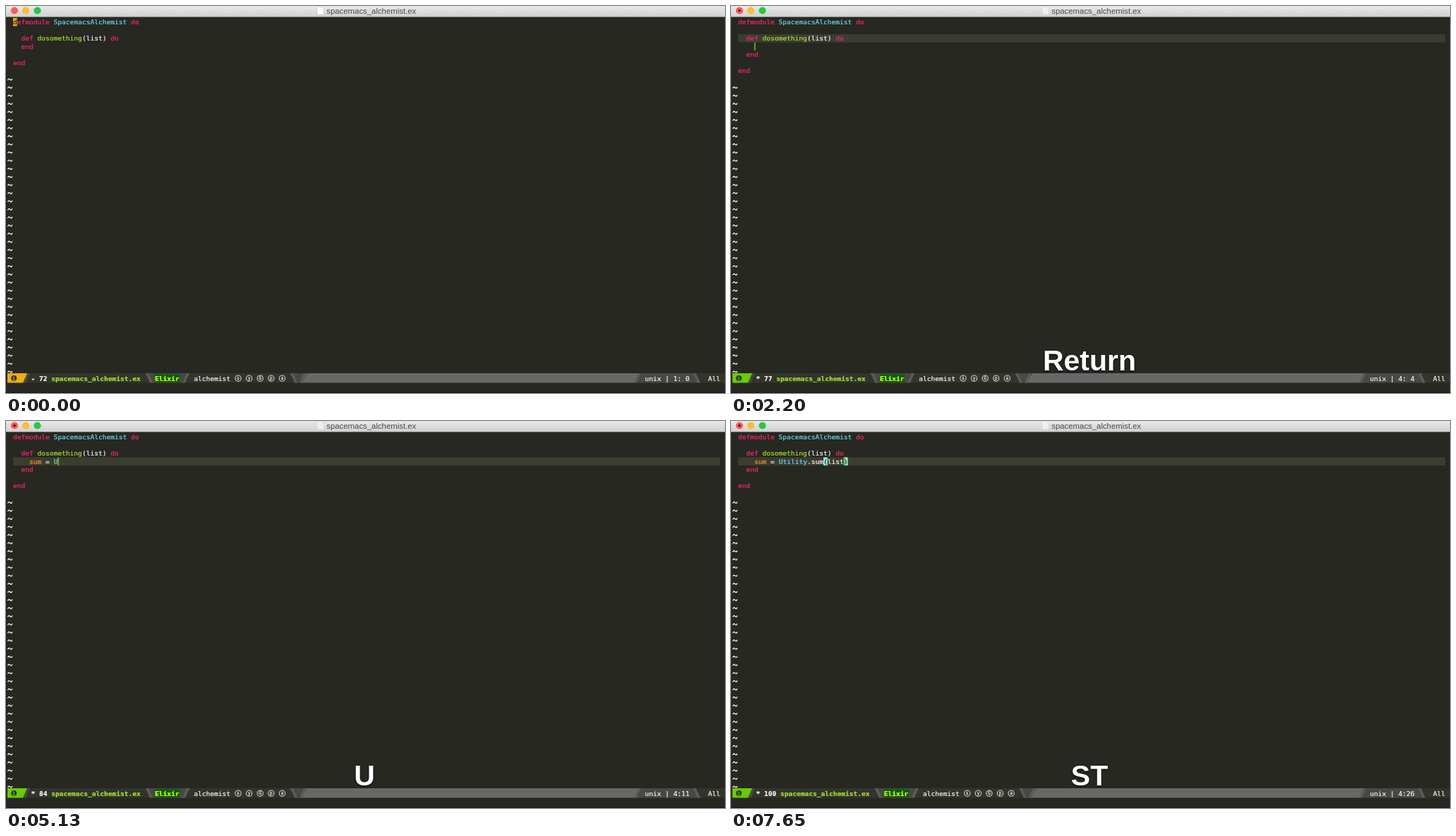
These frames come from a looping animation (1019x549 px, 8 s). An HTML page:

```html
<!DOCTYPE html>
<html lang="en">
<head>
<meta charset="utf-8">
<title>spacemacs_alchemist.ex</title>
<style>
  html, body { margin: 0; width: 100%; height: 100%; overflow: hidden; background: #272822; }
  svg { display: block; width: 1019px; height: 549px; }
  text { white-space: pre; }
  .mono { font: 9.57px "DejaVu Sans Mono", "Liberation Mono", monospace; fill: #f8f8f2; }
  .mono text { stroke-width: .2px; }
  .bold { font-weight: bold; }
  .title { font: 11.37px "Liberation Sans", Arial, sans-serif; fill: #4a4a4a; }
  .key { font: bold 41px "Liberation Sans", Arial, sans-serif; fill: #fff; text-anchor: middle;
         filter: drop-shadow(0 1px 1.5px rgba(0, 0, 0, .8)); }
</style>
</head>
<body>
<svg viewBox="0 0 1019 549" xmlns="http://www.w3.org/2000/svg">
  <defs>
    <linearGradient id="chrome" x2="0" y2="1">
      <stop stop-color="#e9e9e9"/><stop offset="1" stop-color="#d0d0d0"/>
    </linearGradient>
  </defs>
  <rect width="1019" height="549" fill="#272822"/>
  <rect width="1019" height="15.5" fill="url(#chrome)"/>
  <circle cx="12" cy="6.5" r="5.1" fill="#fc5b57"/>
  <circle cx="28" cy="6.5" r="5.1" fill="#fdbc2e"/>
  <circle cx="44.5" cy="6.5" r="5.1" fill="#27c93f"/>
  <circle id="dirtyDot" cx="12" cy="6.5" r="1.8" fill="#5a0805"/>
  <path id="docIcon" d="M441 1h6l3.5 3.5V12.5H441z" fill="#fff" stroke="#b5b5b5" stroke-width=".5"/>
  <text class="title" x="454.3" y="10.6">spacemacs_alchemist.ex</text>
  <g id="tildes" fill="none" stroke="#f8f8f2" stroke-width="1.3"></g>
  <g id="code" class="mono"></g>
  <g id="status" class="mono"></g>
  <rect y="548" width="1019" height="1" fill="#1b151b"/>
  <text id="key" class="key" x="508" y="516.5"></text>
</svg>
<script>
const LOOP = 8000, CHAR = 5.762, ROW = 11.52, LEFT = 10, TOP = 17;
const C = {
  bg: '#272822', line: '#3c3d31', white: '#f8f8f2', pink: '#f92672', cyan: '#66d9ef',
  green: '#a6e22e', orange: '#fd971f', gold: '#eead0e', lime: '#66cd00', pair: '#8ceee0',
  popup: '#349b8c', bar: '#33342c', mid: '#484845', edge: '#5b5b58', gray: '#686868'
};

// Each step overrides part of the editor state from its time on.
const steps = [
  [0, { row: 0, col: 0, hl: -1, insert: false, body: null, key: '', echo: '', popup: false, pairs: false }],
  [320, { row: 1, key: 'J' }],
  [500, { row: 2 }],
  [680, { hl: 2 }],
  [1270, { key: '' }],
  [1470, { key: 'A' }],
  [1670, { col: 26, insert: true }],
  [1870, { echo: '-- INSERT --' }],
  [2200, { row: 3, body: '', key: 'Return', echo: '' }],
  [2730, { key: '' }],
  [3120, { hl: 3 }],
  [3380, { body: 's', key: 'S' }],
  [3555, { body: 'su', key: 'U' }],
  [3730, { body: 'sum', key: 'M' }],
  [4000, { body: 'sum ', key: 'Space' }],
  [4145, { body: 'sum =', key: '=' }],
  [4290, { body: 'sum = ', key: 'Space' }],
  [4650, { key: '' }],
  [5130, { body: 'sum = U', key: 'U' }],
  [5290, { body: 'sum = Ut', key: 'T' }],
  [5450, { body: 'sum = Uti', key: 'I' }],
  [5610, { body: 'sum = Util', key: 'L' }],
  [5770, { popup: true }],
  [6280, { body: 'sum = Utility.sum', key: 'Return', popup: false }],
  [6670, { body: 'sum = Utility.sum()', key: '(' }],
  [6840, { pairs: true }],
  [7290, { body: 'sum = Utility.sum(l)', key: 'L' }],
  [7470, { body: 'sum = Utility.sum(li)', key: 'I' }],
  [7650, { body: 'sum = Utility.sum(list)', key: 'ST' }]
];

const $ = id => document.getElementById(id);
const colX = col => LEFT + col * CHAR;
const rowY = row => TOP + row * ROW;
const rect = (x, y, w, h, fill) => `<rect x="${x}" y="${y}" width="${w}" height="${h}" fill="${fill}"/>`;
const poly = (points, fill) => `<polygon points="${points}" fill="${fill}"/>`;
const cell = (row, col, count, fill) => rect(colX(col), rowY(row), count * CHAR, ROW, fill);
const label = (x, y, str, fill = C.white, cls = '') =>
  `<text x="${x}" y="${y}" class="${cls}" fill="${fill}" stroke="${fill}" xml:space="preserve">${str}</text>`;

function codeLine(row, col, spans) {
  const inner = spans.map(([str, fill]) => `<tspan fill="${fill}" stroke="${fill}">${str}</tspan>`).join('');
  return `<text x="${colX(col)}" y="${rowY(row) + 9.3}" xml:space="preserve">${inner}</text>`;
}

function bodySpans({ body, pairs }) {
  return (body.match(/\w+|\W/g) || []).map((word, i) => {
    if (i === 0 && body.includes('=')) return [word, C.orange];
    if (/^[A-Z]/.test(word)) return [word, C.cyan];
    return [word, pairs && /[()]/.test(word) ? C.bg : C.white];
  });
}

function drawCode(s) {
  const typing = s.body !== null, shift = typing ? 1 : 0;
  let out = '';
  if (s.hl >= 0) out += rect(LEFT, rowY(s.hl), s.popup ? 82 : 1002, ROW, C.line);
  if (s.pairs) out += cell(3, 21, 1, C.pair) + cell(3, s.col, 1, C.pair);
  if (!s.insert) out += cell(s.row, s.col, 1, C.gold);
  out += codeLine(0, 0, [
    ['d', s.row === 0 ? C.bg : C.pink], ['efmodule ', C.pink], ['SpacemacsAlchemist ', C.cyan], ['do', C.pink]
  ]);
  out += codeLine(2, 2, [['def ', C.pink], ['dosomething', C.green], ['(list) ', C.white], ['do', C.pink]]);
  if (typing) out += codeLine(3, 4, bodySpans(s));
  out += codeLine(3 + shift, 2, [['end', C.pink]]) + codeLine(5 + shift, 0, [['end', C.pink]]);
  if (s.insert) out += rect(colX(s.col), rowY(s.row), 1.5, ROW, C.lime);
  if (s.popup) {
    const y = rowY(4) + 9.3;
    out += cell(4, 9, 16, C.popup) + label(colX(10), y, 'Utility.sum', '#fff', 'bold')
      + label(colX(22), y, '/1', '#d5efe9');
  }
  return out + label(LEFT, 544, s.echo);
}

function drawTildes(first) {
  let d = '';
  for (let row = first; row <= 43; row++)
    d += `M2.6 ${rowY(row) + 7.6}c.7 -2.5 2.2 -2.2 3.2 -1s2.4 1.3 3 -1.1`;
  return `<path d="${d}"/>`;
}

// A slanted divider band; positive lean falls to the right.
const slant = (x, lean) => poly(`${x},521 ${x + 4},521 ${x + lean + 4},534.5 ${x + lean},534.5`, C.edge);

function badge(x, letter) {
  return `<circle cx="${x}" cy="528.2" r="4.1" fill="none" stroke="${C.white}" stroke-width=".9"/>`
    + `<text x="${x}" y="530.3" font-size="6.5" text-anchor="middle" stroke="${C.white}">${letter}</text>`;
}

function drawStatus(s) {
  const typing = s.body !== null, y = 531.6;
  const size = typing ? 77 + s.body.length : 72;
  const dx = size > 99 ? CHAR : 0;
  const state = s.insert ? C.lime : C.gold;
  const place = `${s.row + 1}:${String(s.col).padStart(2)}`;
  const minor = [...'syGpa'].map((letter, i) => badge(329 + i * 15.6, letter)).join('');
  return rect(2, 521, 1017, 13.5, C.bar)
    + poly('30,521 34,521 28,534.5 24,534.5', C.mid)
    + poly('2,521 30,521 24,534.5 2,534.5', state)
    + `<circle cx="11.2" cy="528" r="4" fill="#33342c"/>`
    + `<text x="11.2" y="530.5" font-size="7" class="bold" text-anchor="middle" fill="${state}">1</text>`
    + label(35.4, y, `${typing ? '*' : '-'} ${size}`, C.white, 'bold')
    + poly(`${427 + dx},521 900,521 890,534.5 ${418 + dx},534.5`, C.gray)
    + poly('900,521 974,521 984,534.5 890,534.5', C.mid) + slant(896, -6) + slant(974, 6)
    + `<g transform="translate(${dx})">`
    + poly('197,521 261,521 252,534.5 206,534.5', C.mid) + slant(198, 6) + slant(256, -6)
    + poly('402,521 427,521 418,534.5 411,534.5', C.mid) + slant(403, 6) + slant(422, -6)
    + label(64.2, y, 'spacemacs_alchemist.ex', C.green, 'bold')
    + rect(211, 522.5, 35, 11, '#006000') + label(211, y, 'Elixir', '#e2ff00', 'bold')
    + label(266.3, y, 'alchemist') + minor + '</g>'
    + label(905.5, y, `unix | ${place}`) + label(995, y, 'All');
}

function stateAt(time) {
  const s = Object.assign({}, ...steps.filter(([at]) => at <= time).map(([, change]) => change));
  if (s.body !== null) s.col = 4 + s.body.length - (s.body.endsWith(')') ? 1 : 0);
  return s;
}

let shown = -1;
function render(time) {
  const current = steps.filter(([at]) => at <= time).length;
  if (current === shown) return;
  shown = current;
  const s = stateAt(time), typing = s.body !== null;
  $('dirtyDot').style.opacity = typing ? 1 : 0;
  $('docIcon').style.opacity = typing ? .5 : 1;
  $('tildes').innerHTML = drawTildes(typing ? 8 : 7);
  $('code').innerHTML = drawCode(s);
  $('status').innerHTML = drawStatus(s);
  $('key').textContent = s.key;
}

const start = performance.now();
function tick() {
  render((performance.now() - start) % LOOP);
  requestAnimationFrame(tick);
}
tick();
</script>
</body>
</html>
```
